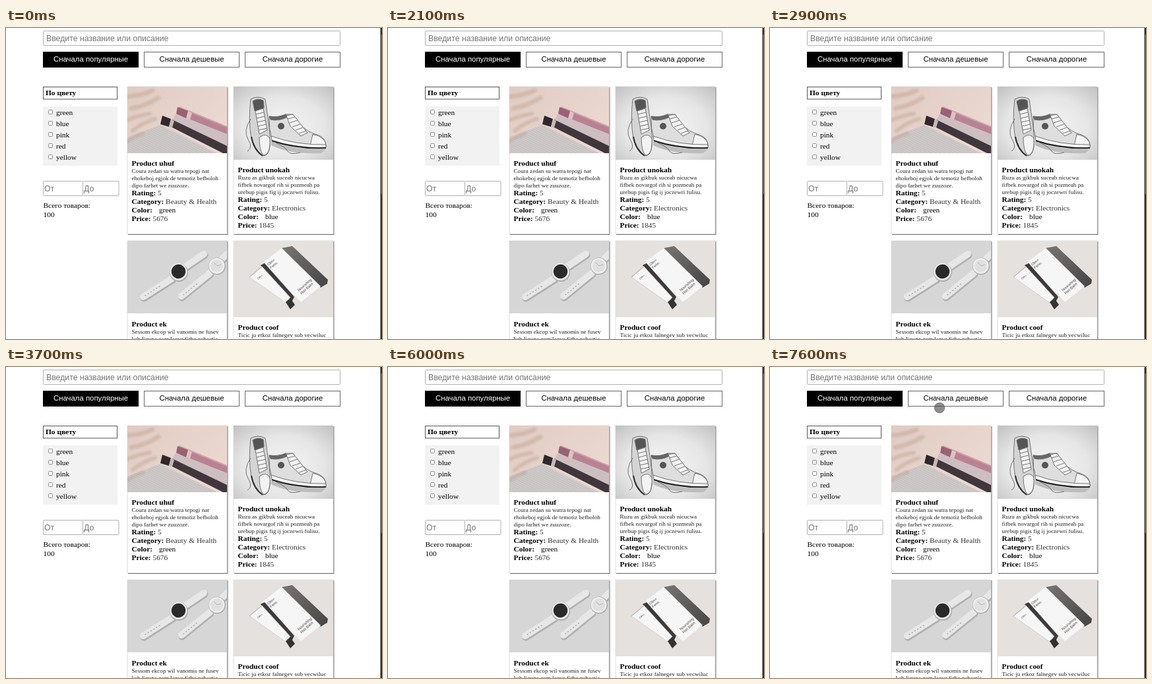
These frames come from a looping animation (570x472 px, 8 s). An HTML page:

```html
<!DOCTYPE html>
<html lang="ru">
<head>
<meta charset="utf-8">
<title>Каталог</title>
<style>
  html, body { margin: 0; width: 100%; height: 100%; overflow: hidden; background: #fff; }
  svg { display: block; width: 570px; height: 472px; }
  text { font: 11.4px "Liberation Serif", serif; white-space: pre; }
  .b { font-weight: bold; }
  .v { fill: #333; }
  .small { font-size: 9.15px; fill: #222; }
  .ui { font-family: "Liberation Sans", sans-serif; }
  .hint { fill: #757575; font-size: 12.3px; }
  .mid { text-anchor: middle; }
  .label { font: 5.5px "Liberation Sans", sans-serif; fill: #444; }
</style>
</head>
<body>
<svg viewBox="0 0 570 472">
  <defs>
    <radialGradient id="studio" cx=".5" cy=".55" r=".75">
      <stop offset="0" stop-color="#f4f4f4"/>
      <stop offset=".55" stop-color="#e6e6e6"/>
      <stop offset="1" stop-color="#c0c0c0"/>
    </radialGradient>
    <linearGradient id="blush" x2="1" y2=".6">
      <stop offset="0" stop-color="#e0cbc2"/>
      <stop offset="1" stop-color="#ebd9d1"/>
    </linearGradient>
    <linearGradient id="side" x1="0" y1="0" x2="1" y2="1">
      <stop offset="0" stop-color="#777574"/>
      <stop offset="1" stop-color="#454444"/>
    </linearGradient>
    <pattern id="knit" width="3" height="3" patternUnits="userSpaceOnUse" patternTransform="rotate(27)">
      <rect width="3" height="3" fill="#cfcaca"/>
      <rect width="3" height="1" fill="#c3bebe"/>
    </pattern>
    <filter id="soft"><feGaussianBlur stdDeviation="1.6"/></filter>
    <clipPath id="c1"><rect x="184" y="89" width="151" height="101"/></clipPath>
    <clipPath id="c2"><rect x="345" y="89" width="151" height="111"/></clipPath>
    <clipPath id="c3"><rect x="184" y="323" width="151" height="110"/></clipPath>
    <clipPath id="c4"><rect x="345" y="323" width="151" height="116"/></clipPath>
  </defs>

  <rect width="570" height="472" fill="#fff"/>
  <rect x="567.5" width="2.5" height="472" fill="#2e2e2e"/>
  <rect x="568.5" y="10" width="1.5" height="242" fill="#686868"/>

  <g id="form"></g>
  <g id="cards"></g>

  <!-- pouches -->
  <g clip-path="url(#c1)">
    <rect x="184" y="89" width="151" height="101" fill="url(#blush)"/>
    <path d="M234 147L184 166V190H320Z" fill="url(#knit)"/>
    <g fill="none" stroke="#bfa193" stroke-linecap="round" opacity=".45" filter="url(#soft)">
      <path d="M184 104Q203 103 222 95M190 122Q212 118 231 106" stroke-width="7"/>
      <path d="M184 140Q200 133 218 130M192 156Q208 143 226 138" stroke-width="6"/>
      <path d="M184 172Q196 164 208 160" stroke-width="6"/>
    </g>
    <path d="M259 128L335 161V190L250 143Z" fill="#cdbfc1"/>
    <path d="M262 120L335 150V161L260 131Z" fill="#b98292"/>
    <path d="M262 120L335 150" stroke="#cf9fab" stroke-width="2"/>
    <path d="M260 120L276 126L273 137L258 130Z" fill="#9a6073"/>
    <path d="M276 126L282 129L279 139L273 137Z" fill="#dcc3c6"/>
    <path d="M252 139L335 179V190H329L248 149Z" fill="#40363c"/>
    <path d="M237 133L250 138L247 150L234 146Z" fill="#2f272c"/>
    <path d="M250 138L255 141L252 151L247 150Z" fill="#c4b9b8"/>
  </g>

  <!-- sneakers -->
  <g clip-path="url(#c2)">
    <rect x="345" y="89" width="151" height="111" fill="url(#studio)"/>
    <path d="M402 172Q440 186 485 184L478 190Q430 192 402 178Z" fill="#bdbdbd"/>
    <g stroke="#666" stroke-width=".9" stroke-linejoin="round" fill="none">
      <path d="M371 108Q382 102 393 108L397 136Q401 160 400 180Q398 195 389 194Q377 188 372 168Q367 140 371 108Z" fill="#d4d4d4"/>
      <path d="M374 111Q382 106 390 110L391 121L377 126Z" fill="#555"/>
      <path d="M378 126L390 122L396 155L384 161Z" fill="#f2f2f2"/>
      <path d="M379 131L391 128M380 137L392 134M381 143L394 140M382 149L395 146M383 155L396 152"/>
      <path d="M384 166Q395 158 400 168Q401 193 390 193Q384 186 384 166Z" fill="#f3f3f3"/>
      <path d="M372 165Q375 184 389 194" stroke="#333" stroke-width="2"/>
      <path d="M371 138Q359 156 367 169T366 187M409 174Q424 181 427 187T446 189"/>
      <path d="M399 134Q412 136 424 131L435 131L445 145Q456 158 472 162Q486 167 485 180Q444 181 403 169Q398 152 399 134Z" fill="#dedede"/>
      <path d="M399 134Q412 137 424 131L427 135Q413 142 401 139Z" fill="#666"/>
      <path d="M425 133L435 131L457 159L447 164L431 149Z" fill="#f3f3f3"/>
      <path d="M427 138L438 135M430 144L442 140M434 150L446 146M439 155L450 151M444 160L455 156"/>
      <path d="M465 161Q486 166 485 180L461 179Z" fill="#f4f4f4"/>
      <path d="M402 164Q440 178 485 177V182Q440 182 403 171Z" fill="#f7f7f7"/>
      <path d="M403 171Q440 184 485 182" stroke="#222" stroke-width="2"/>
    </g>
    <circle cx="417" cy="149" r="5" fill="#555"/>
  </g>

  <!-- watches -->
  <g clip-path="url(#c3)">
    <rect x="184" y="323" width="151" height="110" fill="#d6d6d6"/>
    <g fill="none" stroke-linecap="round">
      <path id="straps" d="M208 408L252 380M272 362L300 343M266 407L309 372M328 350L336 342" stroke="#b0b0b0" stroke-width="11" transform="translate(1 2)"/>
      <path d="M208 408L252 380M272 362L300 343M266 407L309 372M328 350L336 342" stroke="#e7e7e7" stroke-width="10"/>
      <path d="M211 406L235 391M269 405L290 388" stroke="#aaa" stroke-width="1.5" stroke-dasharray="1 4"/>
    </g>
    <circle cx="262" cy="371" r="14" fill="#a9a9a9"/>
    <circle cx="261.5" cy="370" r="13.2" fill="#e8e8e8"/>
    <circle cx="261.5" cy="369.5" r="10.7" fill="#2a2a2a"/>
    <circle cx="320" cy="361.5" r="13" fill="#ababab"/>
    <circle cx="319.5" cy="361" r="12" fill="#eee"/>
    <circle cx="319.5" cy="361" r="9.5" fill="#e0e0e0"/>
    <path d="M320 361L315 356M320 361L326 359" stroke="#aaa" stroke-width=".8"/>
  </g>

  <!-- box and tube -->
  <g clip-path="url(#c4)">
    <rect x="345" y="323" width="151" height="116" fill="#e5e1df"/>
    <path d="M418 334L434 331L488 382L487 388L477 394Z" fill="url(#side)"/>
    <path d="M389 356L418 334L477 392L447 416Z" fill="#f7f6f6"/>
    <path d="M386 360L392 357L437 408L433 416Z" fill="#3c3a3a"/>
    <path d="M369 378L388 362L431 409L424 417Z" fill="#f6f6f6" stroke="#c9c6c5" stroke-width=".7"/>
    <path d="M369 378L388 362" stroke="#c0bdbc" stroke-width="1.5"/>
    <path d="M424 416L431 410L438 420L431 427Z" fill="#333"/>
    <g transform="translate(398 361) rotate(-39)">
      <text class="label">Olm+</text><text class="label" y="6">Fenn.</text>
    </g>
    <g transform="translate(444 400) rotate(-41)">
      <text class="label">Nourishing</text><text class="label" y="6">Hair Balm</text>
    </g>
    <text class="label" style="font-size:4px" transform="translate(382 382) rotate(-39)">Olm+</text>
  </g>

  <circle id="pointer" r="8" fill="#464646" fill-opacity=".62" stroke="#464646" stroke-opacity=".25" opacity="0"/>
</svg>
<script>
const NS = 'http://www.w3.org/2000/svg';
const form = document.getElementById('form');
const cards = document.getElementById('cards');

function add(parent, tag, attrs, content = '') {
  const el = document.createElementNS(NS, tag);
  for (const key in attrs) el.setAttribute(key, attrs[key]);
  el.textContent = content;
  parent.append(el);
  return el;
}
const rect = (g, x, y, width, height, fill, stroke = 'none', rx = 0) =>
  add(g, 'rect', { x, y, width, height, fill, stroke, rx });
const text = (g, x, y, content, cls = '', style = '') =>
  add(g, 'text', { x, y, class: cls, style }, content);

// Search, sorting and filters
const inputLine = '#b0b0b0';
rect(form, 56.5, 4.5, 450, 22, '#fff', inputLine, 1);
text(form, 61, 20, 'Введите название или описание', 'ui hint');

['популярные', 'дешевые', 'дорогие'].forEach((word, i) => {
  const x = 56.5 + i * 153;
  rect(form, x, 36.5, 144, 23, i ? '#fff' : '#000', i ? '#666' : '#000');
  text(form, x + 72, 51, 'Сначала ' + word, 'ui mid', 'fill:' + (i ? '#000' : '#fff'));
});

rect(form, 56.5, 89.5, 112, 18.5, '#fff', '#555');
text(form, 60, 102, 'По цвету', 'b');
rect(form, 56, 119, 113, 90, '#f2f2f2');
['green', 'blue', 'pink', 'red', 'yellow'].forEach((color, i) => {
  const y = 127.7 + i * 17.1;
  rect(form, 64.5, Math.round(y - 4) + .5, 6, 6, '#fff', '#8a8a8a', 1);
  text(form, 76, y + 3.8, color);
});

rect(form, 56.5, 232.5, 60, 22, '#fff', inputLine, 1);
rect(form, 116.5, 232.5, 54.5, 22, '#fff', inputLine, 1);
text(form, 58, 248, 'От', 'ui hint');
text(form, 118, 248, 'До', 'ui hint');
text(form, 56.5, 273, 'Всего товаров:');
text(form, 56.5, 286.5, '100');

// Product cards
function card(x, top, photoBottom, name, about, facts = {}) {
  rect(cards, x + 1, top + 1, 151.5, 224, '#777');
  rect(cards, x, top, 151, 223.5, '#fff', '#ddd');
  const left = x + 6.5;
  text(cards, left, photoBottom + 19, name, 'b');
  about.forEach((line, i) => text(cards, left, photoBottom + 30 + i * 11, line, 'small'));
  Object.entries(facts).forEach(([key, value], i) => {
    const row = text(cards, left, photoBottom + 64 + i * 13.1, '');
    add(row, 'tspan', { class: 'b' }, key + ': ');
    add(row, 'tspan', key === 'Color' ? { x: x + 48 } : { class: 'v' }, value);
  });
}

card(184, 89, 190, 'Product uhuf',
  ['Coura zedan su watra tepogi nat', 'ehokeboj egjok de temotiz befboloh', 'dipo farhet we zuuzoze.'],
  { Rating: '5', Category: 'Beauty & Health', Color: 'green', Price: '5676' });
card(345, 89, 200, 'Product unokah',
  ['Ruzu as gikbuk suceab nicucwa', 'fifbek novargof rih si pozmeah pa', 'urebup pigis fig ij joczewri fulisu.'],
  { Rating: '5', Category: 'Electronics', Color: 'blue', Price: '1845' });
card(184, 323, 434, 'Product ek',
  ['Sessom ekcop wil vanomis ne fusev', 'kab ligune gem lagve firbe zubactie']);
card(345, 323, 439, 'Product coof', ['Ticic ju etkoz falnegev sub vecwiluc']);

// Pointer: time, x, y, visible
const duration = 8000;
const steps = [
  [0, 433.5, 184, 0],
  [6300, 433.5, 184, 1],
  [6800, 282.5, 141.5, 1],
  [7300, 249.5, 68.5, 1],
  [7500, 253, 65, 1],
  [7600, 257, 62, 1],
  [duration, 257, 62, 1]
];
document.getElementById('pointer').animate(
  steps.map(([time, x, y, opacity]) => ({
    offset: time / duration,
    transform: `translate(${x}px, ${y}px)`,
    opacity,
    easing: 'steps(1, end)'
  })),
  { duration, iterations: Infinity }
);
</script>
</body>
</html>
```
